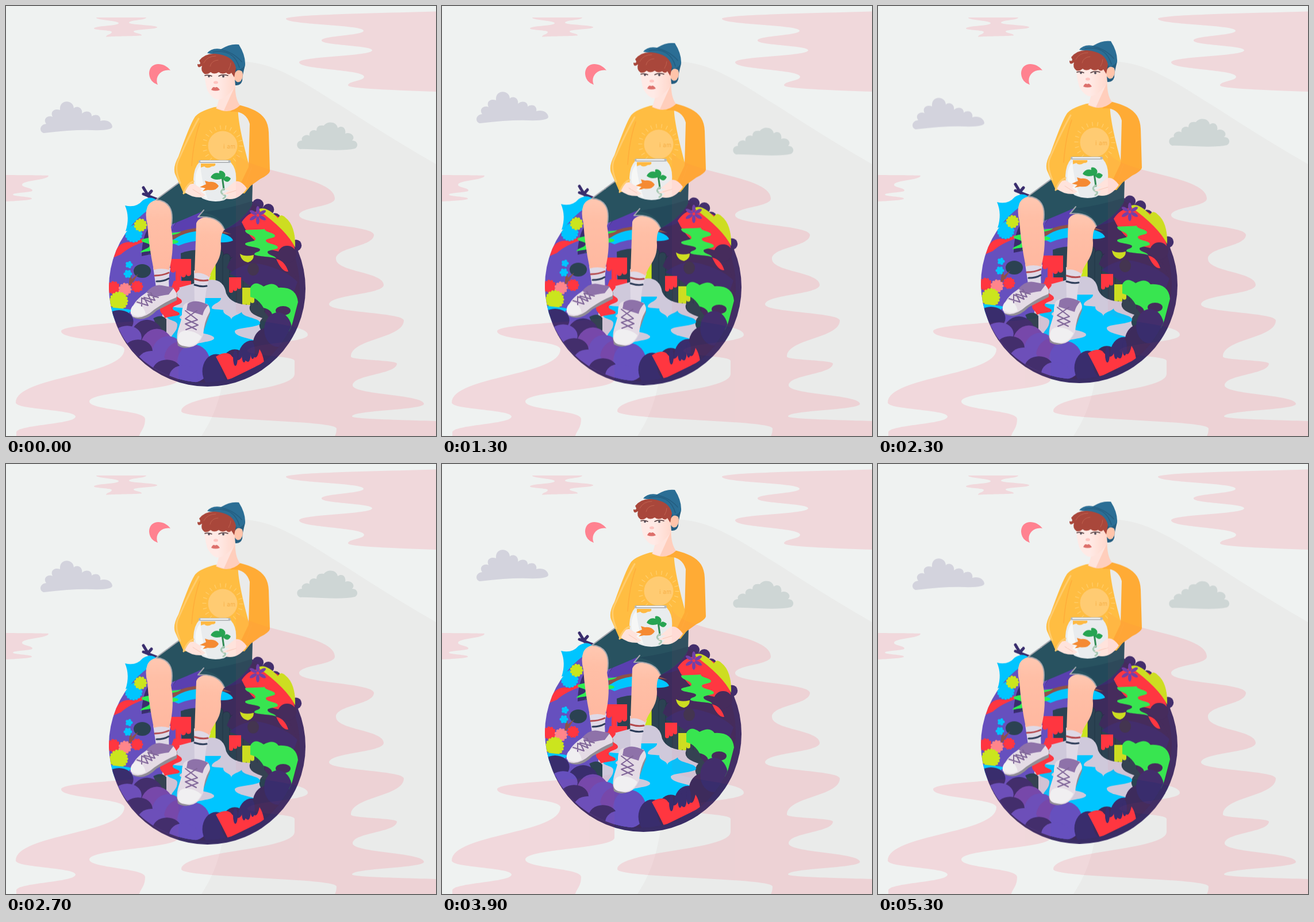
Recreate the animation shown at these times as an HTML page. Size 748x748 px, loop 5400 ms.

```html
<!DOCTYPE html>
<html lang="en">
<head>
<meta charset="utf-8">
<title>Floating planet</title>
<style>
  html, body { margin: 0; width: 100%; height: 100%; overflow: hidden; background: #eff2f1; }
  svg { display: block; width: 100vw; height: 100vh; }
  .float { animation: 5400ms infinite; }
  #planet { animation-name: planet; }
  #cloudL { animation-name: cloudL; }
  #cloudR { animation-name: cloudR; }
  @keyframes planet {
    0% { transform: none; animation-timing-function: steps(7); }
    12.963% { transform: translateY(10.2px); animation-timing-function: steps(11); }
    33.3333% { transform: translateY(-13px); animation-timing-function: steps(10); }
    51.8519% { transform: translateY(1.2px); animation-timing-function: steps(11); }
    72.2222% { transform: translateY(-22px); animation-timing-function: steps(15); }
    100% { transform: none; }
  }
  @keyframes cloudL {
    0% { transform: none; animation-timing-function: steps(8); }
    14.8148%, 33.3333% { transform: translateY(-17px); animation-timing-function: steps(9); }
    50% { transform: translateY(2px); animation-timing-function: steps(12); }
    72.2222%, 83.3333% { transform: translateY(-17px); animation-timing-function: steps(9); }
    100% { transform: none; }
  }
  @keyframes cloudR {
    0% { transform: none; animation-timing-function: steps(3); }
    5.5556% { transform: translateY(-3px); animation-timing-function: steps(13); }
    29.6296% { transform: translateY(13px); animation-timing-function: steps(11); }
    50% { transform: translateY(-17px); animation-timing-function: steps(12); }
    72.2222% { transform: translateY(1px); animation-timing-function: steps(7); }
    85.1852% { transform: translateY(11px); animation-timing-function: steps(8); }
    100% { transform: none; }
  }
  .line { fill: none; stroke-linecap: round; stroke-linejoin: round; }
  .pale { fill: #ffe3dc }
  .shoe { fill: #e4dbe5 } .cap { fill: #f0eff1 } .sole { fill: #918d96 } .tongue { fill: #8e72a9 }
  .lace { stroke: #806699; stroke-width: 2; }
</style>
</head>
<body>
<svg viewBox="0 0 748 748">
  <defs>
    <clipPath id="disc"><circle cx="345" cy="489" r="166"/></clipPath>
    <linearGradient id="leg" x2="0" y2="1"><stop stop-color="#ffc8b2"/><stop offset=".3" stop-color="#ffbfa6"/><stop offset="1" stop-color="#ffb8a0"/></linearGradient>
    <linearGradient id="face"><stop offset=".45" stop-color="#ffeae6"/><stop offset="1" stop-color="#ffd8cc"/></linearGradient>
    <g id="mist" fill="#fc526c"></g>
  </defs>

  <path fill="#eaebea" d="M400 96Q440 96 478 113C520 132 550 154 590 178Q676 234 748 275V748H340C378 690 375 650 388 600Z"/>
  <path fill="#ff8290" d="M286 112C275 97 249 96 249 118Q250 132 264 137C258 124 269 109 286 112Z"/>
  <use href="#mist" opacity=".105"/>

  <path id="cloudL" class="float" fill="#d3d3dd" d="M66 221C57 219 58 206 70 205C63 196 74 189 81 193C76 182 86 178 94 181C92 162 117 162 118 178C124 172 134 178 132 187C140 180 150 184 149 192C158 186 166 192 164 200C175 197 184 202 185 210Q184 217 150 216T66 221Z"/>
  <path id="cloudR" class="float" fill="#ced6d5" d="M512 249C504 247 504 234 515 234C512 226 524 222 528 226C526 218 534 214 540 217Q540 206 553 208C558 200 575 200 577 212C586 206 592 214 590 222C600 218 609 228 602 234C612 234 614 244 607 248Q590 252 550 250T512 249Z"/>

  <g id="planet" class="float">
    <path class="line" stroke="#392d6d" stroke-width="5" d="M262 336L239 327M248 331L239 316M247 329L253 322"/>
    <path fill="#00c5ff" d="M207 347Q226 352 238 338Q254 328 264 340L262 370L208 392Q216 368 207 347Z"/>
    <g id="bumps" fill="#392d6d"></g>
    <circle cx="350.5" cy="491.500" r="170.500" fill="#392d66"/>
    <g id="scene" clip-path="url(#disc)"></g>
    <g id="hill"></g>

    <!-- legs and socks -->
    <path fill="#dfd9e6" d="M256 455L286 456Q281 478 285 500L262 496ZM327 460L356 468Q346 492 346 522L328 517Z"/>
    <path class="line" stroke="#b44a4e" stroke-width="3" d="M259 469Q272 469 283 464M328 475Q340 479 351 477"/>
    <path class="line" stroke="#2d3c58" stroke-width="3" d="M262 479Q275 479 283 474M328 485Q340 489 349 487"/>
    <path fill="url(#leg)" d="M246 349C254 332 281 334 290 352Q292 368 287 385Q294 420 284 459Q270 455 257 459Q248 415 246 380Q241 362 246 349Z"/>
    <path fill="url(#leg)" d="M331 378C337 362 368 363 381 388Q372 396 374 418C374 446 359 452 354 472Q341 462 328 465Z"/>

    <!-- shoes -->
    <path class="sole" d="M218 535L221 542Q242 551 262 530L297 512L298 500Z"/>
    <path class="shoe" d="M217 534Q220 514 242 500Q253 490 260 499Q282 490 290 490Q300 501 296 507Q278 514 258 528Q237 547 220 540Z"/>
    <path class="cap" d="M217 535Q215 523 227 517Q240 521 243 536Q230 544 217 535Z"/>
    <path class="tongue" d="M244 498Q257 483 271 486L292 490L283 502Q268 504 258 507Z"/>
    <path class="line lace" d="M228 515L247 521L240 507L259 512L252 499M236 522V508L254 516L247 502L265 507"/>
    <path class="sole" d="M297 580L299 591Q319 602 337 583L355 535L353 520Z"/>
    <path class="shoe" d="M298 582C295 565 306 552 306 535Q306 518 316 516L350 518Q358 528 353 535Q345 548 343 572Q333 598 311 592Q300 591 298 582Z"/>
    <path class="cap" d="M298 580Q300 563 316 565Q330 566 340 575Q332 594 311 591Q299 590 298 580Z"/>
    <path class="tongue" d="M316 518Q329 508 352 520Q344 528 342 538L314 529Z"/>
    <path class="line lace" d="M312 530L333 546L312 553L331 563M332 530L312 544L334 555L313 563"/>

    <!-- shorts -->
    <path fill="#285260" d="M306 305Q282 321 261 338Q294 338 288 380Q315 369 340 358L333 368Q370 364 380 389Q413 373 428 346L429 308Z"/>
    <path fill="#23495a" d="M426 340Q390 352 341 359Q370 362 382 387Q414 371 428 346Z"/>
    <path class="line" stroke="#a3a5ac" stroke-width="2" d="M304 305L261 337Q294 340 288 380M344 355L334 367Q370 364 380 389"/>

    <!-- sweater -->
    <path fill="#ffbd42" d="M362 176Q334 184 328 194Q320 206 300 262Q290 280 294 292L309 326H415L431 306Q400 200 404 172Z"/>
    <path fill="#ffab35" d="M404 172C439 180 456 192 457 220L459 287Q458 293 442 301L417 319L409 307L422 280L424 205Q417 181 390 184Z"/>
    <path class="line" stroke="#ffcc6c" stroke-width="3" d="M335 196Q320 222 299 270Q293 284 303 308"/>
    <path class="line" stroke="#ffad3a" stroke-width="1.500" d="M337 204Q326 235 323 278M417 308L427 281"/>
    <circle cx="377" cy="243" r="25.500" fill="#ffcb72"/>
    <circle cx="377" cy="243" r="32" fill="none" stroke="#ffd173" stroke-width="7" pathLength="22" stroke-dasharray=".12 .88"/>
    <text x="378" y="248" font-family="Inter,sans-serif" font-size="10" fill="#f6ae46" letter-spacing=".5">i am</text>

    <!-- fish bowl -->
    <path fill="#e9ecee" d="M336 272H391Q402 284 400 306Q397 329 379 338Q360 343 342 335Q326 323 326 301Q327 281 336 272Z"/>
    <path fill="#f6f7f6" d="M338 277Q327 290 330 309Q335 330 351 336Q341 309 338 277Z"/>
    <path fill="#ffb942" d="M339 274H364Q366 279 358 279Q350 284 345 279L339 281Z"/>
    <rect x="335" y="268" width="56" height="5" rx="2.500" fill="#b4b8bb"/>
    <rect x="338" y="269" width="49" height="2" rx="1" fill="#f8f8f6"/>
    <path class="line" stroke="#318b54" stroke-width="3" d="M376 297L379 319"/>
    <path fill="#27a452" d="M377 300Q364 305 356 298Q361 288 371 291Q369 284 378 288Q384 293 380 299Q383 293 391 300Q386 311 377 301Z"/>
    <path class="line" stroke="#a8c9b4" stroke-width="3" d="M379 318Q370 323 378 328Q385 330 378 335"/>
    <path fill="#f58a32" d="M370 313Q364 304 353 306L346 304L348 310L337 315L347 317L342 322L351 320Q366 322 370 313Z"/>

    <!-- hands -->
    <path class="pale" d="M310 323Q316 308 326 309L341 318L338 322L347 329L339 333Q321 333 310 323Z"/>
    <path class="pale" d="M419 317Q407 301 397 306L380 320H389L376 328H388L382 335Q404 340 419 317Z"/>
    <path class="line" stroke="#f7c8b9" d="M325 319L339 328M384 326L400 321"/>
    <path class="line" stroke="#ffcc70" stroke-width="3" d="M309 326Q315 309 326 305"/>

    <!-- neck and head -->
    <path fill="#ffcebc" d="M372 156L399 132Q397 159 407 173Q389 190 365 178Q373 169 372 156Z"/>
    <path class="pale" d="M371 160Q389 153 398 140L379 182L366 178Z"/>
    <path fill="#245d80" d="M396 108L416 103Q411 121 411 130Q408 139 399 138Z"/>
    <path fill="url(#face)" d="M345 105Q344 125 350 146Q359 163 370 163Q384 160 398 141V103Z"/>
    <path fill="#ffc4aa" d="M397 119Q402 107 411 114Q414 123 408 131Q402 135 398 128Z"/>
    <path fill="#2b6e95" d="M350 82Q358 72 374 75Q390 65 405 67Q417 86 416 103Q409 111 402 112Q392 88 350 82Z"/>
    <path class="line" stroke="#245d80" stroke-width="1.500" d="M360 80Q396 74 406 107M373 76Q395 80 410 97"/>
    <path fill="#a9473b" d="M345 118Q338 113 341 104Q333 110 333 101Q341 103 336 95Q346 82 364 83Q396 86 400 108L397 124L392 116Q388 121 383 116Q376 120 370 115Q362 120 356 115Q350 120 345 118Z"/>
    <path class="line" stroke="#c16250" d="M344 99Q350 87 365 87M355 105Q357 95 369 94M387 111Q391 104 391 99"/>
    <path class="line" stroke="#4b3437" stroke-width="1.500" d="M346 121Q352 119 358 122M370 122Q377 118 386 121"/>
    <g fill="#55505c"><circle cx="353" cy="122.500" r="1.800"/><circle cx="378" cy="122.500" r="2"/></g>
    <ellipse cx="365" cy="133" rx="4" ry="2.500" fill="#ffc4c0"/>
    <path fill="#dd6f6b" d="M357 146Q360 139 364 142Q367 139 372 146Q365 149 357 146Z"/>
  </g>

  <use href="#mist" opacity=".05"/>
</svg>
<script>
  const C = {
    red: '#ff3640', blue: '#00c5ff', lime: '#cbe51e', green: '#2eee50', navy: '#392d6d', dark: '#3d2b5c',
    slate: '#2b4252', violet: '#6650be', plum: '#7048ae', lilac: '#cfc9db', pink: '#ff858b', brown: '#8e5148'
  };
  const layer = id => document.getElementById(id);
  const scene = layer('scene'), mist = layer('mist'), hill = layer('hill');

  function add(parent, tag, attrs) {
    const el = document.createElementNS('http://www.w3.org/2000/svg', tag);
    for (const key in attrs) el.setAttribute(key, attrs[key]);
    return parent.appendChild(el);
  }
  const shape = (parent, d, color) => add(parent, 'path', color ? { d, fill: color } : { d });
  const oval = (parent, cx, cy, rx, ry, fill) => add(parent, 'ellipse', { cx, cy, rx, ry, fill });

  let seed = 7;
  const random = () => (seed = seed * 16807 % 2147483647) / 2147483647;

  // Flowing outline: S-curves that turn upright at every outer and inner tip
  function wave(parent, tips, color) {
    const pts = tips.split(' ').map(p => p.split(',').map(Number));
    const d = pts.map(([x, y], i) => {
      const [nx, ny] = pts[(i + 1) % pts.length], mid = (y + ny) / 2;
      return `C${x} ${mid} ${nx} ${mid} ${nx} ${ny}`;
    });
    shape(parent, 'M' + pts[0] + d.join('') + 'Z', color);
  }

  // Round crown with a scalloped edge
  function tree(x, y, r, color) {
    add(scene, 'circle', {
      cx: x, cy: y, r, fill: color, stroke: color, pathLength: Math.round(r * 1.2),
      'stroke-width': 5, 'stroke-linecap': 'round', 'stroke-dasharray': '0 1'
    });
  }

  // Paint running down from a flat top edge
  function drips(x, y, count, w, len, color) {
    let d = `M${x} ${y}`;
    for (let i = 0; i < count; i++) d += `V${y + len * (.4 + .6 * random())}a${w / 2} ${w / 2} 0 0 0 ${w} 0`;
    shape(scene, d + `V${y}Z`, color);
  }

  const ring = (deg, r) => {
    const a = deg * Math.PI / 180;
    return [345 + r * Math.cos(a), 489 + r * Math.sin(a)];
  };

  // Mist banks
  wave(mist, '157,20 244,20 214,29 263,37 222,44 236,51 174,54 184,45 153,39 196,30');
  wave(mist, '900,0 487,22 622,43 549,60 637,77 510,98 623,123 595,138 900,160');
  wave(mist, '-60,293 74,295 28,311 46,321 12,328 45,335 -60,346');
  wave(mist, '300,535 96,566 206,597 17,690 121,714 18,742 18,760 230,760 242,718 145,688 300,650');
  wave(mist, '400,248 572,335 510,364 640,398 574,440 657,485 562,519 692,547 600,610 680,622 603,660 ' +
    '727,692 602,714 900,730 900,760 570,760 575,735 305,705 502,640 502,617 420,600 525,572 400,530');

  // Ground and sky of the planet
  shape(scene, 'M170 310H330V670H170Z', C.violet);
  shape(scene, 'M330 310H530V670H330Z', C.dark);
  shape(scene, 'M290 385Q320 335 430 340L418 378Q360 400 290 385Z', C.navy);
  shape(scene, 'M286 392Q310 350 348 355L330 395Z', '#5a3fb0');
  shape(scene, 'M290 398Q340 374 392 397Q340 390 290 406Z', C.brown);
  shape(scene, 'M286 411Q308 391 346 391Q390 394 395 408Q378 415 350 407Q320 408 300 417Z', C.blue);

  // Left side
  shape(scene, 'M186 438Q195 405 222 412Q242 400 246 408Q215 418 200 432Z', C.red);
  tree(222, 396, 13, C.blue);
  tree(234, 381, 9, C.lime);
  shape(scene, 'M236 435Q236 405 248 385L252 432Z', C.navy);
  wave(scene, '262,398 304,392 282,403 300,410 270,420 246,436 256,424 234,430 250,416 236,408', C.green);
  oval(scene, 237, 461, 15, 12, C.slate);
  shape(scene, 'M216 462L219 475L230 466L221 480L213 490Z', C.brown);
  tree(214, 450, 4, C.blue);
  tree(212, 466, 5, C.blue);
  tree(187, 490, 9, C.red);
  tree(228, 488, 8, C.red);
  tree(207, 493, 9, C.pink);
  tree(196, 513, 14, C.lime);

  // Stepped cliffs
  shape(scene, 'M304 430Q330 420 372 426L376 505L306 495Z', C.slate);
  drips(286, 440, 4, 9, 48, C.red);
  shape(scene, 'M292 478H322V498H285Z', C.red);
  shape(scene, 'M352 425H370Q363 455 366 488Q360 505 350 495Z', C.lime);
  for (let i = 0; i < 7; i++) {
    add(scene, 'rect', {
      x: 365 + 12 * i, y: 425 + 6 * i, width: 13, height: 86 + 2 * i, rx: 6, fill: C.slate, stroke: '#1f3040', 'stroke-width': .7
    });
  }
  shape(scene, 'M384 455Q400 410 450 425Q500 430 511 500L440 482Q405 475 384 455Z', C.dark);
  shape(scene, 'M388 466Q420 440 455 452Q490 462 507 480L500 500Q460 475 430 492Q405 470 388 466Z', C.navy);
  shape(scene, 'M407 431Q415 437 431 433Q431 443 421 446Q409 444 407 431Z', C.lime);
  oval(scene, 430, 458, 10, 11, '#3a3450');
  drips(388, 472, 3, 7, 28, C.red);
  drips(411, 490, 3, 7, 32, C.lime);
  shape(scene, 'M432 515Q450 530 460 546Q485 558 495 573L460 605L420 560Z', C.slate);
  shape(scene, 'M425 490Q432 476 448 488Q466 478 474 490Q505 488 508 515L494 568Q470 548 462 546Q468 530 448 525Q438 508 425 506Z', C.green);
  oval(scene, 482, 530, 13, 8, C.dark);

  // Lake
  shape(scene, 'M275 560Q262 525 300 490L345 478Q378 470 383 500Q392 520 425 520Q418 534 446 543Q430 560 462 580Q450 602 410 603L370 626L345 604L306 616Q310 590 285 598Z', C.lilac);
  wave(scene, '338,508 374,508 358,526 410,532 442,552 398,566 448,592 398,604 365,632 350,610 325,592 362,578 330,562 352,540', C.blue);
  wave(scene, '284,522 328,528 302,542 338,554 300,564 318,576 286,584 298,554 280,540', C.blue);
  wave(scene, '372,516 402,516 412,528 392,546 378,530', C.lilac);
  wave(scene, '284,488 302,490 296,502 306,514 290,526 302,536 276,544 268,528', C.red);

  // Shores along the lower rim
  wave(scene, '178,522 219,530 205,542 240,552 226,576 196,562', C.blue);
  shape(scene, 'M240 555Q268 530 279 545V600H242Z', C.slate);
  const shore = [C.violet, C.navy, C.plum, C.violet, C.plum, C.violet];
  shore.forEach((color, i) => oval(scene, ...ring(148 - 10 * i, 134), 29, 33, color));
  for (let i = 0; i < 6; i++) oval(scene, ...ring(158 - 11 * i, 160), 25, 20, i % 2 ? C.violet : C.navy);
  for (let i = 0; i < 5; i++) oval(scene, ...ring(82 - 13 * i, 148), 24, 30, i % 2 ? C.dark : C.navy);
  shape(scene, 'M365 610Q378 634 386 651L449 620Q447 606 441 597Q436 622 426 604Q424 632 411 608Q405 625 390 606Q380 600 365 610Z', C.red);
  for (let i = 0; i < 3; i++) oval(scene, 399 + 15 * i, 612 - 6 * i, 4, 14, C.navy);

  // Upper right hill, its bushes and flower
  for (let i = 0; i < 6; i++) oval(layer('bumps'), ...ring(-57 + 6.5 * i, 171 + 4 * (i % 2)), 10, 10);
  shape(hill, 'M410 376C425 352 450 352 474 367Q500 390 503 432Q488 423 474 427Q430 420 410 376Z', C.red);
  shape(hill, 'M438 354Q452 346 473 369Q478 360 486 368Q504 382 503 420Q488 390 438 354Z', C.lime);
  for (let i = 0; i < 6; i++) {
    add(hill, 'ellipse', { cx: 438, cy: 355, rx: 3, ry: 7, fill: '#6a41ad', transform: `rotate(${60 * i} 438 364)` });
  }
  wave(hill, '416,390 450,388 468,400 452,408 473,420 455,428 470,440 432,432 442,424 416,414 434,406', C.green);
  oval(hill, 489, 432, 16, 15, C.dark);
  shape(hill, 'M470 440Q485 443 491 462Q480 463 470 440Z', C.red);
</script>
</body>
</html>
```
